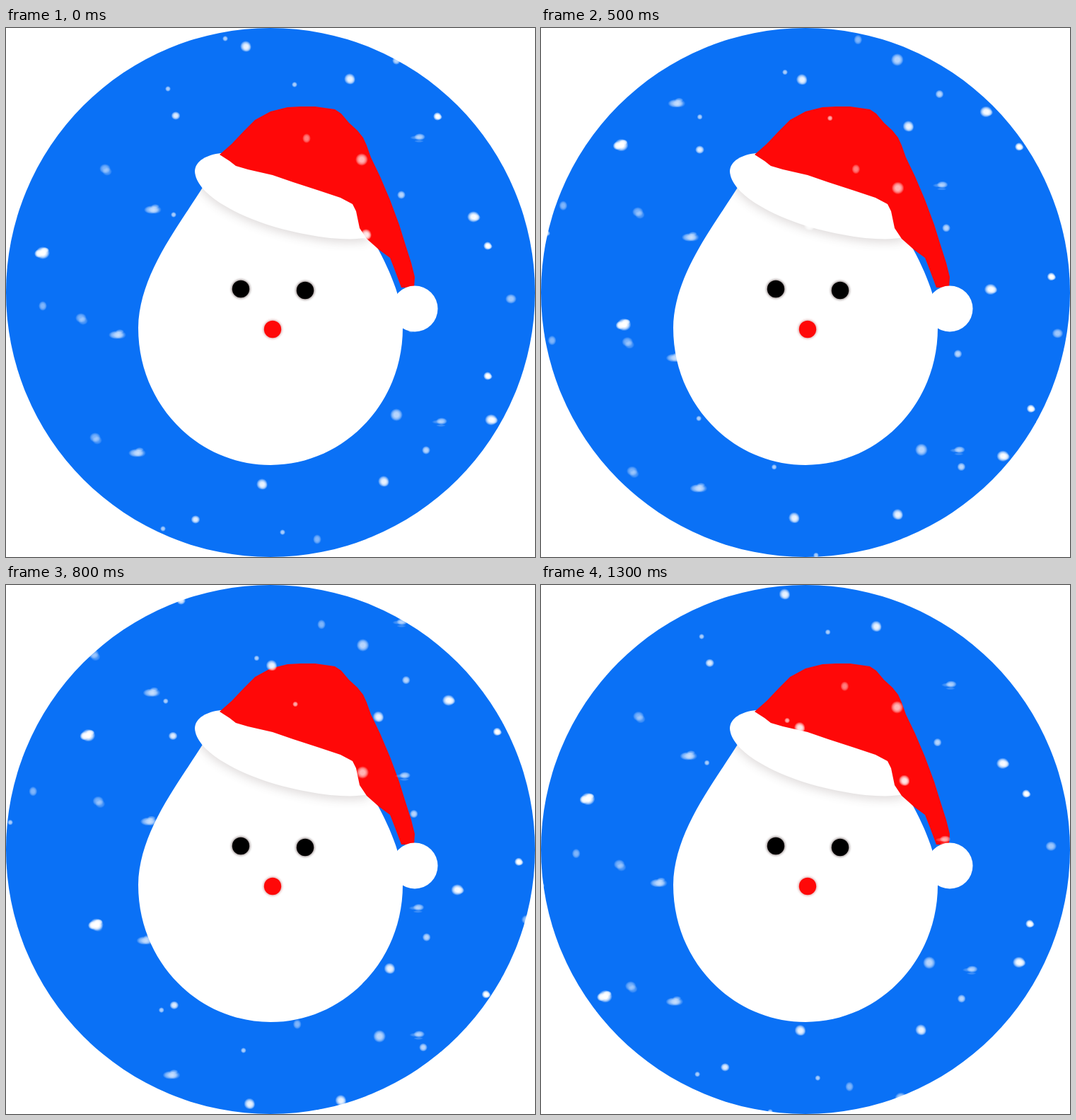
These frames come from a looping animation (748x748 px, 1.4 s). An HTML page:

```html
<!DOCTYPE html>
<html lang="en">
<head>
<meta charset="utf-8">
<title>Snowy head</title>
<style>
html, body { margin: 0; width: 100%; height: 100%; overflow: hidden; background: #fff; }
svg { display: block; width: 100vw; height: 100vh; }
</style>
</head>
<body>
<svg viewBox="0 0 748 748">
  <defs>
    <radialGradient id="soft">
      <stop offset=".35" stop-color="#fff"/>
      <stop offset=".65" stop-color="#fff" stop-opacity=".7"/>
      <stop offset="1" stop-color="#fff" stop-opacity="0"/>
    </radialGradient>
    <filter id="blur" x="-30%" y="-30%" width="160%" height="160%"><feGaussianBlur stdDeviation="7"/></filter>
    <filter id="glow" x="-50%" y="-50%" width="200%" height="200%"><feGaussianBlur stdDeviation="1.8"/></filter>
    <path id="head" d="M279 224C242 283 188 350 187 424C187 533 272 618 374 618S561 533 561 424C561 405 557 386 551 368C544 348 535 328 522 305L440 230Z"/>
    <path id="cuff" d="M304 177C284 179 267 188 267 203C268 218 281 233 302 247C345 274 400 290 458 297C480 299 500 299 513 296L520 250L400 190Z"/>
    <clipPath id="inHead"><use href="#head"/></clipPath>
  </defs>
  <circle cx="374" cy="374" r="374" fill="#0a71f6"/>
  <use href="#head" fill="#fff"/>
  <g clip-path="url(#inHead)">
    <use href="#cuff" y="5" fill="#4a3030" filter="url(#blur)" opacity=".17"/>
  </g>
  <use href="#cuff" fill="#fff"/>
  <path fill="#ff0808" d="M302 179L319 164L337 145L352 130L374 118L398 112L417 111L437 111L465 115L474 121L485 134L497 145L505 155L510 166L516 183L529 210L543 243L556 278L565 307L573 332L578 352L577 367H559L550 343L543 325L528 314L510 298L500 283L495 259L490 249L473 240L443 230L406 218L377 208L342 200L325 195L316 188Z"/>
  <circle cx="578" cy="397" r="32.5" fill="#fff"/>
  <g id="snow"></g>
  <g id="face"></g>
</svg>
<script>
const LOOP = 14, STEP = 100;
const dot = (x, y, rx, ry, o) =>
  `<ellipse cx="${x}" cy="${y}" rx="${rx}" ry="${ry}" fill="url(#soft)" opacity="${o}"/>`;

const KINDS = {
  bold: dot(1, 0, 10, 9, 1) + dot(-5, 1, 6, 6, .9) + dot(4, -4, 6, 4, .8),
  bright: dot(0, 0, 9, 8, .95) + dot(4, 1, 6, 5, .6),
  crisp: dot(0, 0, 6, 6, 1) + dot(2, 1, 5, 4, .7),
  round: dot(0, 0, 8, 8, .85) + dot(2, 2, 6, 6, .4),
  small: dot(0, 0, 6.5, 6, .85),
  pale: dot(0, 0, 6, 6, .7),
  tiny: dot(0, 0, 4, 4, .65),
  haze: dot(-1, -1, 8, 7, .45) + dot(2, 3, 7, 6, .3),
  puff: dot(0, 0, 9, 9, .7),
  faint: dot(0, 0, 6, 7, .48),
  disc: dot(0, 0, 8, 7, .6),
  drift: dot(-2, 0, 11, 6, .6) + dot(3, 0, 9, 6, .4) + dot(3, -5, 6, 3, .35),
  streak: dot(1, 0, 8, 5, .6) + dot(-4, 1, 9, 3, .25) + dot(0, 6, 7, 2, .2)
};

// Each stream passes one point per loop, so its flakes follow each other without a seam.
const streams = [];
const stream = (kind, bend, ...points) => streams.push({ kind, bend, points });

stream("bold", 62, [60, 100], [51, 318], [78, 602]);
stream("bright", -38, [665, 60], [661, 267], [686, 554], [690, 750]);
stream("crisp", 45, [610, 125], [681, 308], [681, 492], [600, 680]);
stream("disc", 8, [790, 190], [714, 383], [740, 575]);
stream("pale", 10, [552, 46], [559, 236], [573, 425], [594, 597], [570, 750]);
stream("round", 28, [230, -120], [486, 72], [509, 292], [490, 470], [534, 641], [380, 830]);
stream("round", 24, [340, -160], [339, 26], [362, 215], [350, 430], [362, 645], [290, 835]);
stream("tiny", 25, [310, 15], [345, 205], [320, 395], [300, 585], [320, 757]);
stream("tiny", 0, [375, -110], [408, 80], [410, 270], [395, 490], [391, 713], [385, 880]);
stream("small", -45, [360, -70], [240, 124], [310, 315], [300, 510], [268, 695], [200, 885]);
stream("tiny", -8, [228, -100], [229, 86], [237, 264], [235, 480], [222, 708], [222, 890]);
stream("drift", 24, [150, 45], [208, 257], [158, 434], [186, 601], [230, 795]);
stream("haze", 10, [80, 10], [141, 200], [107, 411], [127, 580], [110, 770]);
stream("faint", 0, [20, 205], [52, 393], [-50, 585]);
stream("tiny", 0, [14, 230], [0, 440]);
stream("streak", -15, [560, -40], [584, 154], [573, 375], [615, 556], [585, 735]);
stream("puff", 3, [500, 0], [503, 186], [500, 365], [552, 547], [505, 740]);
stream("faint", 15, [440, -25], [425, 156], [444, 340], [340, 530], [440, 723], [380, 910]);

// Slow flakes hesitate at the start of a loop; all of them bow sideways on the way.
function place([x0, y0], [x1, y1], bend, u) {
  const drop = y1 - y0, lag = Math.max(0, 260 - drop) * .165;
  const ease = Math.cos(.25) - Math.cos(2 * Math.PI * u + .25);
  return [x0 + (x1 - x0) * u + bend * Math.sin(Math.PI * u), y0 + drop * u - lag * ease];
}

function button(x, y, fill, shade) {
  return `<circle cx="${x}" cy="${y}" r="13.5" fill="${shade}" opacity=".5" filter="url(#glow)"/>` +
    `<circle cx="${x}" cy="${y}" r="12.2" fill="${fill}"/>`;
}
document.getElementById("face").innerHTML =
  button(332, 369, "#000", "#3a2424") + button(423, 371, "#000", "#3a2424") +
  button(377, 426, "#ff0808", "#c46060");

const snow = document.getElementById("snow");
let shown = -1;

function draw(ms) {
  const step = Math.floor(ms / STEP) % LOOP;
  if (step === shown) return;
  shown = step;
  let out = "";
  for (const { kind, bend, points } of streams) {
    for (let i = 1; i < points.length; i++) {
      const [x, y] = place(points[i - 1], points[i], bend, step / LOOP);
      out += `<g transform="translate(${x.toFixed(1)} ${y.toFixed(1)})">${KINDS[kind]}</g>`;
    }
  }
  snow.innerHTML = out;
}

const start = performance.now();
function tick() {
  draw(performance.now() - start);
  requestAnimationFrame(tick);
}
tick();
</script>
</body>
</html>
```
